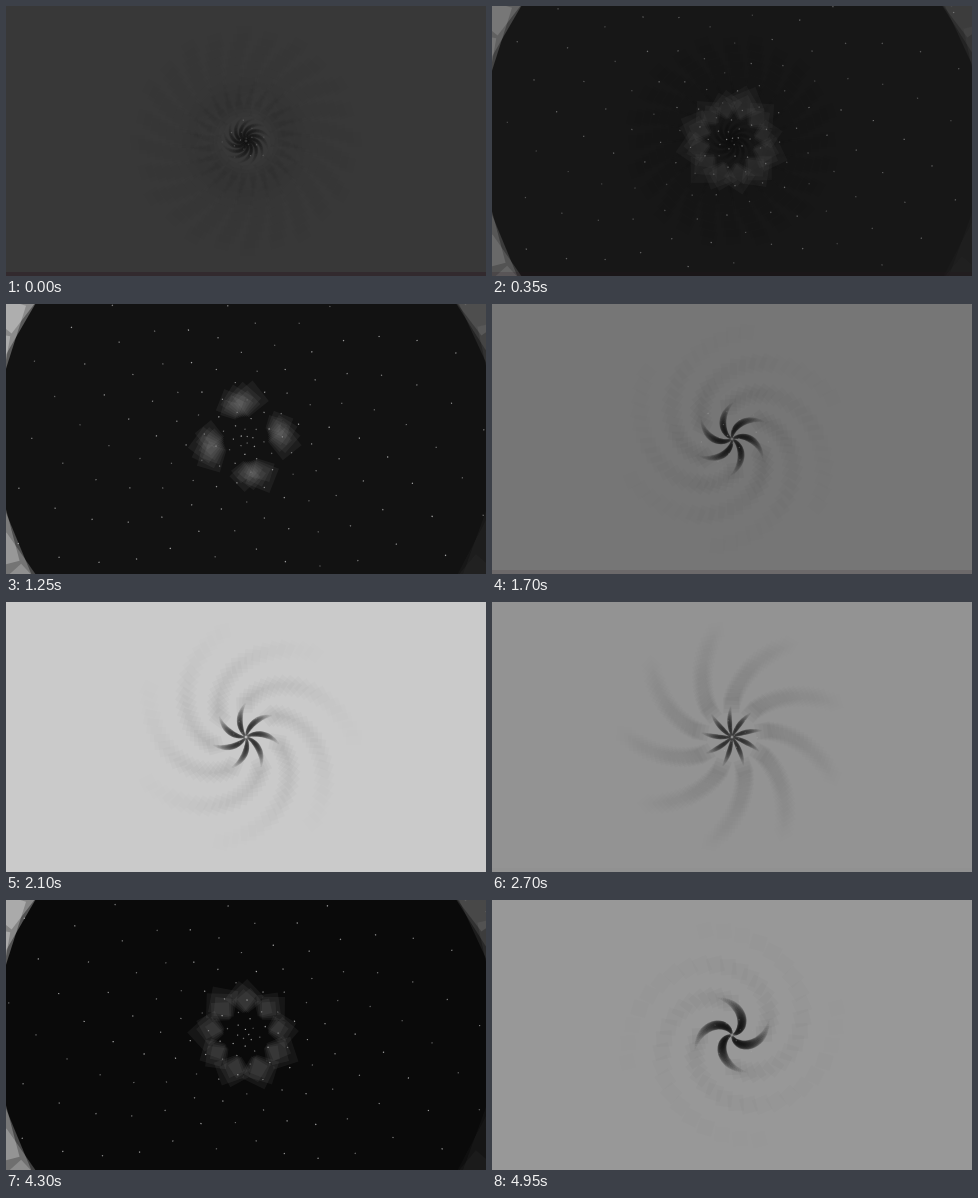
An HTML page with a canvas for the animation above (5 s loop, 480x270 px).

```html
<!DOCTYPE html>
<html>
<head>
<meta charset="utf-8">
<style>
html, body { margin: 0; height: 100%; overflow: hidden; background: #000; }
canvas { display: block; }
</style>
</head>
<body>
<canvas id="stage" width="480" height="270"></canvas>
<script>
const ctx = document.getElementById('stage').getContext('2d');
const LOOP = 5000, TICK = 50, RIM = 250, STARS = 200;
const TAU = Math.PI * 2, DEG = Math.PI / 180, GOLDEN = 2.39996;

// time, grey level, number of arms
const KEYS = [
  [0, 56, 12], [750, 2, 11], [1250, 18, 4], [2100, 202, 7],
  [3550, 53, 12], [4300, 10, 9], [4950, 152, 4]
];

const clamp = x => Math.max(0, Math.min(1, x));
const grey = (level, alpha = 1) => `rgba(${level},${level},${level},${alpha})`;

function stateAt(time) {
  const next = KEYS.findIndex(key => key[0] > time);
  if (next < 0) return KEYS[KEYS.length - 1];
  const from = KEYS[next - 1], to = KEYS[next];
  const u = (time - from[0]) / (to[0] - from[0]);
  const eased = u * u * (3 - 2 * u);
  return from.map((value, k) => value + (to[k] - value) * eased);
}

// Runs paint with the origin moved to a polar position, x pointing outwards
function at(angle, radius, paint) {
  ctx.save();
  ctx.rotate(angle);
  ctx.translate(radius, 0);
  paint();
  ctx.restore();
}

function drawRim() {
  for (let i = 0; i < 40; i++) {
    const angle = i * GOLDEN;
    ctx.fillStyle = grey(255, .16 + .14 * Math.cos(angle + 150 * DEG));
    at(angle, RIM, () => ctx.fillRect(0, -60, 60, 120));
  }
}

function drawPetals(arms, alpha) {
  const layers = Math.round(32 / arms);
  ctx.fillStyle = grey(255, alpha);
  for (let k = 0; k < arms; k++) {
    for (let j = 0; j < layers; j++) {
      const fan = ((j + .5) / layers - .5) * 160 / arms;
      const side = 14 + (k * 5 + j * 7) % 13;
      at(k * TAU / arms + (fan - 11) * DEG, 22, () => {
        ctx.rotate(-Math.PI / 4);
        ctx.fillRect(0, 0, side, side);
      });
    }
  }
}

function drawArms(arms, extent, seconds, alpha) {
  const phase = 6.5 * seconds - 43, twist = 4 - 1.32 * seconds;
  for (let k = 0; k < arms; k++) {
    const angle = r => k * TAU / arms + (phase + twist * r) * DEG;
    for (let r = 32; r < 112; r += 4) {
      ctx.fillStyle = grey(0, .035 * alpha * (1 - r / 120));
      at(angle(r), r, () => ctx.fillRect(-8, -8, 16, 16));
    }
    for (let r = 2; r < extent; r++) {
      const width = .7 + 16 / arms * Math.sin(Math.PI * r / extent);
      ctx.fillStyle = grey(0, .3 * alpha * (1.1 - r / extent));
      at(angle(r), r, () => {
        ctx.beginPath();
        ctx.arc(0, 0, width, 0, TAU);
        ctx.fill();
      });
    }
  }
}

function drawStars(extent, veil, seconds) {
  ctx.globalCompositeOperation = 'lighten';
  for (let i = 2; i < STARS; i++) {
    const r = i * 1.4;
    ctx.fillStyle = grey(100 + i * 5 % 7 * 12, r < extent ? 1 - veil * .6 : 1 - veil);
    at(i * GOLDEN + seconds * .3, r, () => ctx.fillRect(-.6, -.6, 1.2, 1.2));
  }
  ctx.globalCompositeOperation = 'source-over';
}

function draw(time) {
  const [, level, armCount] = stateAt(time);
  const seconds = time / 1000, arms = Math.round(armCount);
  const veil = clamp((level - 20) / 30), extent = 48 - 2 * armCount;

  ctx.fillStyle = grey(Math.min(level, 18));
  ctx.fillRect(0, 0, 480, 270);
  ctx.save();
  ctx.translate(240, 135);
  drawRim();
  ctx.fillStyle = grey(level, veil);
  ctx.fillRect(-240, -135, 480, 270);
  drawPetals(arms, .05 * (1 - .9 * veil));
  drawArms(arms, extent, seconds, veil);
  drawStars(extent, veil, seconds);
  ctx.restore();

  ctx.fillStyle = `rgba(42,20,30,${.6 * veil * clamp(1 - level / 150)})`;
  ctx.fillRect(0, 266, 480, 4);
}

const start = performance.now();
function frame() {
  const elapsed = (performance.now() - start) % LOOP;
  draw(Math.floor(elapsed / TICK) * TICK);
  requestAnimationFrame(frame);
}
frame();
</script>
</body>
</html>
```
